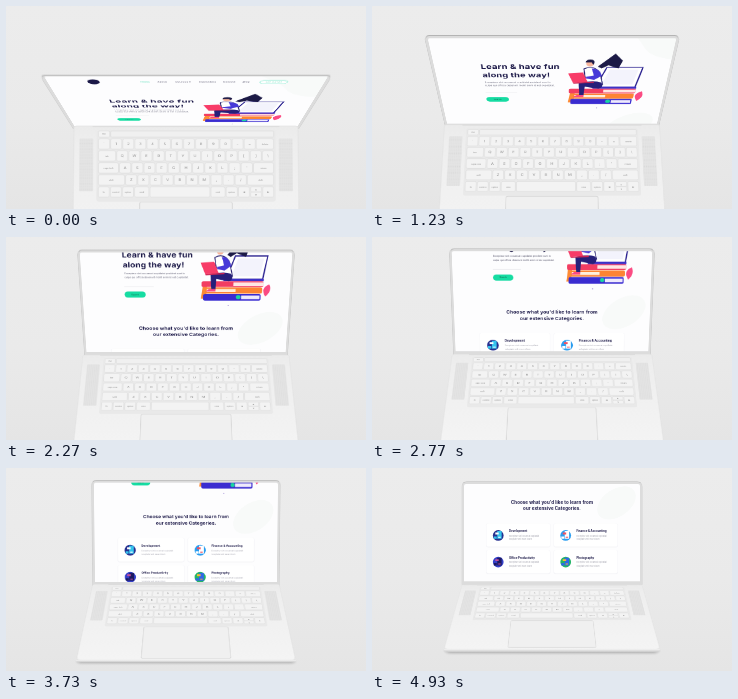
Recreate the animation shown at these times as an HTML page. Size 360 by 203 pixels, loop 4960 ms.

```html
<!DOCTYPE html>
<html lang="en">
<head>
<meta charset="utf-8">
<title>Laptop with course page</title>
<style>
html, body { margin: 0; width: 100%; height: 100%; overflow: hidden; }
body { position: relative; background: linear-gradient(#ececec, #eaeaea 55%, #e5e5e5); }
div, svg { position: absolute; left: 0; top: 0; }
svg { display: block; width: 100%; height: 100%; font-family: Inter, sans-serif; }
#lid, #base { transform-origin: 0 0; }
#rim { left: -1.4%; right: -1.4%; top: -3%; bottom: -4%; box-sizing: border-box;
  background: #dcdcdc; border: 1.5px solid #d0d0d0; border-top-color: #b4b4b4; border-radius: 8px 8px 0 0; }
#screen { width: 100%; height: 100%; overflow: hidden; background: #fdfdfe; border-radius: 3px 3px 0 0; }
#front { background: linear-gradient(#f4f4f4, #d2d2d2 60%, #b4b4b4); border-radius: 0 0 7px 7px / 0 0 4px 4px;
  box-shadow: 0 1px 2px #0002; }
.head { font-weight: 700; fill: #1b1847; }
.body { fill: #55546a; }
</style>
</head>
<body>
<div id="lid">
  <div id="rim"></div>
  <div id="screen">
    <svg id="page" viewBox="0 0 360 200" preserveAspectRatio="none">
      <g fill="#f8faf9">
        <path d="M270 -10H360V64Q326 60 314 36T270 -10Z"/>
        <ellipse cx="312" cy="226" rx="44" ry="28" transform="rotate(-35 312 226)"/>
      </g>
      <circle cx="60" cy="11" r="8" fill="#1b1847"/>
      <g id="nav" font-size="4.3" font-weight="500" text-anchor="middle"></g>
      <rect x="276" y="6.5" width="36" height="10.5" rx="5.2" fill="#fff" stroke="#62e3c1" stroke-width=".8"/>
      <text x="294" y="13.2" font-size="4" fill="#20c997" text-anchor="middle">Get started</text>

      <g class="head" font-size="14.3" letter-spacing=".25">
        <text x="71" y="85">Learn &amp; have fun</text>
        <text x="72" y="104">along the way!</text>
      </g>
      <g class="body" font-size="4.4">
        <text x="74" y="117">Excepteur sint occaecat cupidatat proident sunt in</text>
        <text x="74" y="124.5">culpa qui officia deserunt mollit anim id est cupidatat.</text>
      </g>
      <path d="M73 141H124" stroke="#e8e8ec" stroke-width="1"/>
      <rect x="73" y="151" width="37" height="12" rx="6" fill="#16dca2"/>
      <text x="91.5" y="158.5" font-size="4" fill="#12604d" text-anchor="middle">Search</text>

      <!-- reader, books and open laptop -->
      <path d="M318 161Q308 144 324 137Q330 150 318 161Z" fill="#fb4b83"/>
      <path d="M206 165L210 132H217L215 165Z" fill="#fd8a35"/>
      <path d="M264 82H319L312 127H249Z" fill="#fff" stroke="#2c2390" stroke-width="2.2"/>
      <path d="M269 87H313L307 121H258Z" fill="#f3f3fc"/>
      <path d="M246 126H314V131H244Z" fill="#3d31c8"/>
      <g>
        <rect x="207" y="131" width="107" height="11" rx="3" fill="#f23d62"/>
        <rect x="262" y="133" width="52" height="7" fill="#ffe7e4"/>
        <rect x="214" y="143" width="98" height="12" rx="3" fill="#fd8433"/>
        <rect x="216" y="146" width="50" height="6" fill="#fff0dc"/>
        <rect x="210" y="156" width="100" height="13" rx="3" fill="#3a2cd0"/>
        <rect x="276" y="159" width="32" height="7" fill="#eeeafc"/>
        <circle cx="271" cy="162" r="4" fill="#18d6a0"/>
      </g>
      <path d="M250 80L275 52L287 67L282 84L266 77L256 84Z" fill="#1c1a46"/>
      <path d="M229 85Q244 76 254 93L260 121H234Z" fill="#fff" stroke="#27206f" stroke-width="1.6"/>
      <path d="M241 84Q254 84 257 101L246 110L233 107V103L245 100Z" fill="#4739d8"/>
      <circle cx="238" cy="73.5" r="6" fill="#f8b59b"/>
      <path d="M231 71Q232 63 241 65Q247 68 243 76L240 71Z" fill="#1c1a46"/>
      <path d="M257 116Q245 111 222 117L224 147H231L232 126L254 131Q264 126 257 116Z" fill="#26207a"/>
      <path d="M220 146H231V151H214Z" fill="#fb4b83"/>
      <path d="M205 95L228 93L236 115L213 117Z" fill="#f83c68"/>
      <path d="M213 117L246 114V117L214 119Z" fill="#c92553"/>
      <circle cx="254" cy="179" r="1.1" fill="#a796d8"/>

      <g class="head" font-size="9.1" letter-spacing=".17" text-anchor="middle">
        <text x="180" y="228.5">Choose what you'd like to learn from</text>
        <text x="180" y="241.5">our extensive Categories.</text>
      </g>
      <g id="cards"></g>
    </svg>
  </div>
</div>
<div id="base"><svg id="deck" viewBox="0 0 360 250" preserveAspectRatio="none" overflow="visible"></svg></div>
<div id="front"></div>

<script>
const $ = id => document.getElementById(id);
const text = (x, y, s, attrs = '') => `<text x="${x}" y="${y}" ${attrs}>${s}</text>`;
const box = (x, y, w, h, r, attrs) =>
  `<rect x="${x}" y="${y}" width="${w}" height="${h}" rx="${r}" ${attrs}/>`;

// Page navigation and category cards
$('nav').innerHTML = [['Home', 127], ['About', 149], ['Courses ▾', 176], ['Instructors', 208], ['Contact', 236], ['Blog', 258]]
  .map(([s, x], i) => text(x, 13, s, `fill="${i ? '#34324f' : '#16cf9a'}"`)).join('');

const cards = [
  ['Development', '#27308f', '#35c4ee', '#ffffff'],
  ['Finance &amp; Accounting', '#2a9df0', '#ffffff', '#ef5361'],
  ['Office Productivity', '#3540c8', '#1c1a60', '#c44ea0'],
  ['Photography', '#23b567', '#2f67e8', '#fdb63a']
];
$('cards').innerHTML = cards.map(([title, back, mid, dot], i) => {
  const x = i % 2 * 138, y = (i >> 1) * 55;
  return `<g transform="translate(${x} ${y})">` +
    box(45, 268, 132, 50, 4, 'fill="#f5f5f8"') +
    box(46, 268, 130, 48, 4, 'fill="#fff"') +
    `<circle cx="70" cy="293" r="11" fill="${back}"/>` +
    `<path d="M68 284H77V300H68ZM61 295H67V300H61Z" fill="${mid}"/>` +
    `<path d="M64 287H71V291H64ZM70 296H75V298H70Z" fill="${dot}"/>` +
    text(92, 286, title, 'class="head" font-size="5.8"') +
    '<g font-size="3.9" fill="#a3a3ae">' +
    text(92, 295.5, 'Excepteur sint occaecat cupidatat') +
    text(92, 302.5, 'voluptate velit esse cillum') + '</g></g>';
}).join('');

// Keyboard: label or [label, width in key units]
const unit = 19.5, keyX = 38.6;
const rows = [
  [...'`1234567890-=', ['delete', 1.5]],
  [['tab', 1.5], ...'QWERTYUIOP[]\\'],
  [['caps lock', 1.75], ...'ASDFGHJKL;\'', ['return', 1.75]],
  [['shift', 2.25], ...'ZXCVBNM,./', ['shift', 2.25]],
  ['fn', 'control', 'option', ['cmd', 1.25], ['', 5], ['cmd', 1.25], 'option', '◂', '▴▾', '▸']
];
const keyStyle = 'fill="#f3f3f3" stroke="#dadada" stroke-width=".8"';
const keys = rows.map((row, r) => {
  let x = keyX;
  const y = 25.5 + r * 23.5;
  return row.map(k => {
    const [label, w] = Array.isArray(k) ? k : [k, 1];
    const left = x, width = w * unit;
    x += width;
    if (label === '▴▾') {
      return box(left + 1, y, width - 2, 9.5, 2, keyStyle) + box(left + 1, y + 10.5, width - 2, 9.5, 2, keyStyle) +
        text(left + width / 2, y + 7, '▴') + text(left + width / 2, y + 17.5, '▾');
    }
    const size = label.length > 1 ? 3.6 : 6.5;
    return box(left + 1, y, width - 2, 20, 2.5, keyStyle) +
      text(left + width / 2, y + 12.5, label, `font-size="${size}"`);
  }).join('');
}).join('');

const grille = x => box(x, 25, 22, 103, 1, 'fill="#e4e4e4"') + box(x, 25, 22, 103, 1, 'fill="url(#dots)"');
$('deck').innerHTML =
  `<defs><pattern id="dots" width="3" height="3" patternUnits="userSpaceOnUse">
    <circle cx="1.5" cy="1.5" r=".8" fill="#d9d9d9"/></pattern>
  <linearGradient id="shell" x2="0" y2="1"><stop stop-color="#ebebeb"/><stop offset=".15" stop-color="#eeeeee"/>
    <stop offset="1" stop-color="#f4f4f4"/></linearGradient></defs>` +
  '<path d="M0 4Q0 0 4 0H356Q360 0 360 4V240Q360 250 350 250H10Q0 250 0 240Z" fill="url(#shell)" stroke="#e1e1e1"/>' +
  '<path d="M30 1H330" stroke="#dcdcdc" stroke-width="2"/>' +
  grille(9) + grille(329) +
  box(keyX - 2, 8, 287, 140, 4, 'fill="#e9e9e9"') +
  box(keyX + 1, 10, 17.5, 12, 2, keyStyle) + box(keyX + 20.5, 10, 261.5, 12, 2, 'fill="#f0f0f0" stroke="#dcdcdc"') +
  `<g fill="#8f8f8f" font-size="5" text-anchor="middle">${keys}${text(keyX + 9.7, 17.5, 'esc', 'font-size="3.6"')}</g>` +
  box(106, 149, 148, 95, 3, 'fill="#f0f0f0" stroke="#d4d4d4" stroke-width="1.1"');

// time, screen (top half-width, top, bottom half-width, bottom), scroll, base (same four), front height
const poses = [
  [0, 142, 70.5, 111, 121, -6, 112, 120, 113, 248, 0],
  [670, 133, 47.5, 108, 119.5, 0, 110, 119.5, 115, 248, 0],
  [1770, 115.5, 20, 102, 115.5, 45.5, 105, 118, 114.5, 234, 1],
  [2270, 106.3, 15.5, 99.5, 115, 75.5, 103, 118, 114, 222, 1.5],
  [3330, 95, 14, 93, 114, 138, 96, 116.5, 110.5, 200, 2.5],
  [4130, 90, 15.5, 89.5, 113.5, 172, 91, 116.5, 109, 186.5, 3.5],
  [4930, 88, 16, 88, 113, 187, 90, 117, 108, 181.5, 4.2]
];
const last = poses.length - 1;

function slope(i, c) {
  const p = poses[Math.max(i - 1, 0)], q = poses[Math.min(i + 1, last)];
  return (q[c] - p[c]) / (q[0] - p[0]);
}

// Cubic Hermite curve through the poses
function poseAt(t) {
  let i = 0;
  while (i < last - 1 && t >= poses[i + 1][0]) i++;
  const p = poses[i], q = poses[i + 1], span = q[0] - p[0];
  const u = Math.min((t - p[0]) / span, 1), v = 1 - u;
  return p.slice(1).map((_, n) => {
    const c = n + 1;
    return v * v * (1 + 2 * u) * p[c] + u * u * (3 - 2 * u) * q[c] +
      span * u * v * (v * slope(i, c) - u * slope(i + 1, c));
  });
}

// Maps a panel onto a centred trapezoid; the panel is laid out near its final size to stay sharp
function project(el, a, top, b, bottom) {
  const width = 3 * Math.max(a, b), height = 1.5 * (bottom - top);
  const ratio = a / b, k = (ratio - 1) / height, m = (bottom * ratio - top) / height;
  const cells = [2 * a / width, 0, 0, 0, 180 * k, m, 0, k, 0, 0, 1, 0, 180 - a, top, 0, 1];
  el.style.cssText = `width:${width}px;height:${height}px;transform:matrix3d(${cells.map(n => n.toFixed(8)).join()})`;
}

function draw(now) {
  const [a, top, b, bottom, scroll, c, back, d, edge, depth] = poseAt(now % 4960);
  project($('lid'), a, top, b, bottom);
  project($('base'), c, back, d, edge);
  $('page').setAttribute('viewBox', `0 ${scroll} 360 200`);
  $('front').style.cssText = `left:${180 - d}px;top:${edge - .5}px;width:${2 * d}px;height:${Math.max(0, depth)}px`;
}

const start = performance.now();
function tick() {
  draw(performance.now() - start);
  requestAnimationFrame(tick);
}
tick();
</script>
</body>
</html>
```
